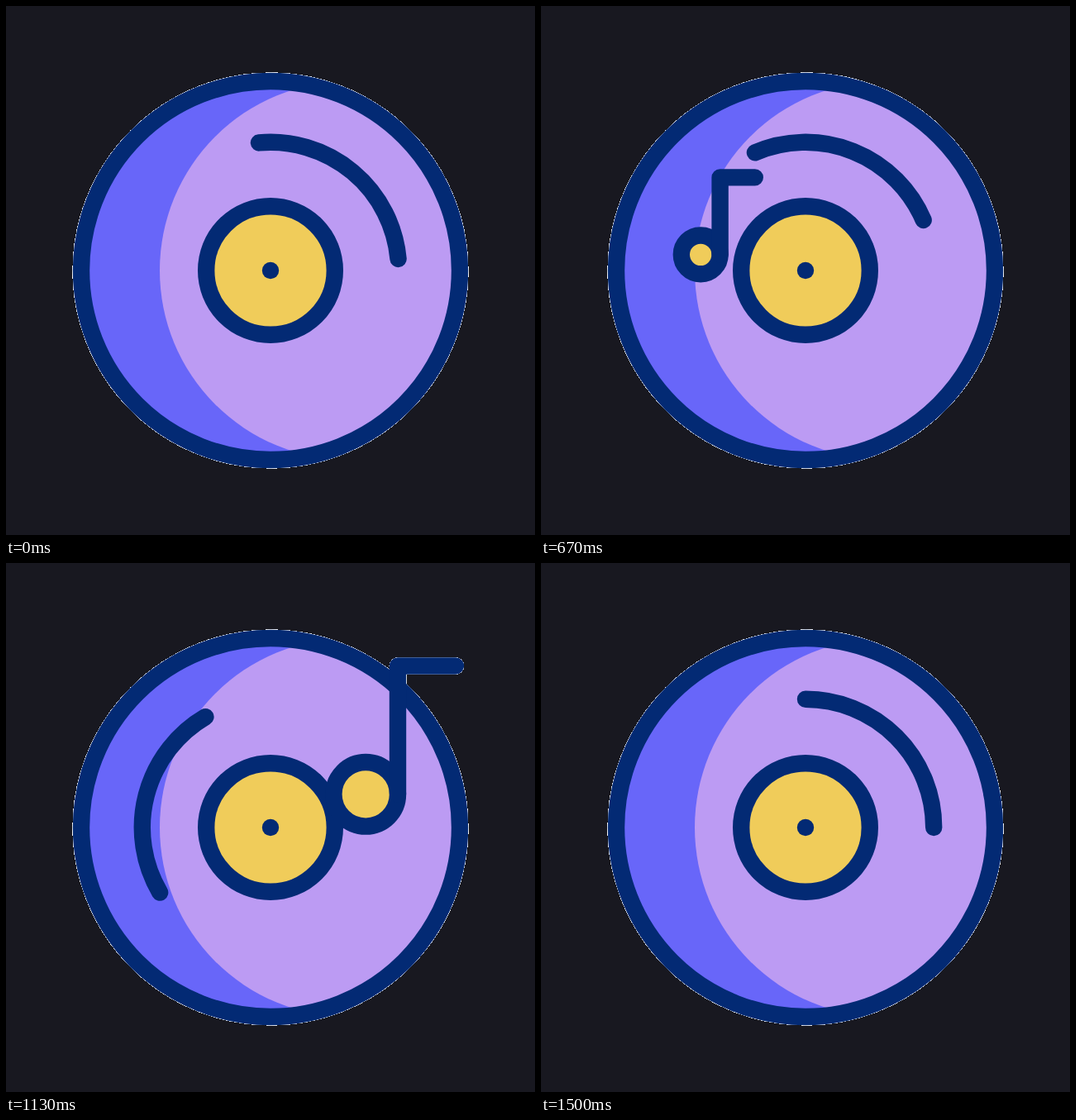
Recreate the animation shown at these times as an HTML page. Size 640 by 640 pixels, loop 2000 ms.

```html
<!DOCTYPE html>
<html lang="en">
<head>
<meta charset="utf-8">
<title>Spinning record</title>
<style>
  html, body { margin: 0; height: 100%; overflow: hidden; background: #181820; }
  svg { display: block; width: 100%; height: 100%; }
  .line { stroke: #032a74; stroke-width: 20.4; stroke-linecap: round; stroke-linejoin: round; }
  .halo { fill: #fff; stroke: #fff; stroke-width: 21; stroke-linecap: round; stroke-linejoin: round; shape-rendering: crispEdges; }
  .gold { fill: #f0cc5a; }
</style>
</head>
<body>
<svg viewBox="0 0 640 640">
  <defs>
    <clipPath id="face"><circle cx="320" cy="320" r="229"/></clipPath>
    <g id="small">
      <circle cx="193.2" r="23.4"/>
      <path fill="none" d="M216.6 0V-93.5H258.8"/>
    </g>
    <g id="large">
      <circle cx="435.2" r="38.8"/>
      <path fill="none" d="M474 0V-155.3H544"/>
    </g>
  </defs>

  <!-- white edges, visible only outside the disc -->
  <use href="#small" class="halo"/>
  <use href="#large" class="halo"/>
  <circle class="halo" cx="320" cy="320" r="229.2"/>

  <circle cx="320" cy="320" r="229" fill="#6866f9"/>
  <circle cx="415" cy="320" r="229" fill="#bc9bf3" clip-path="url(#face)"/>
  <circle class="line" cx="320" cy="320" r="229" fill="none"/>
  <circle class="line gold" cx="320" cy="320" r="77.8"/>
  <circle cx="320" cy="320" r="10.2" fill="#032a74"/>
  <path id="shine" class="line" fill="none" d="M320 164.8A155.2 155.2 0 0 1 475.2 320"/>

  <use href="#small" class="line gold note"/>
  <use href="#large" class="line gold note"/>
</svg>
<script>
  const LOOP = 2000, FPS = 30, RISE = 215, FADE_IN = 260, FADE_OUT = 305;
  const shine = document.getElementById('shine');
  const halos = document.querySelectorAll('use.halo');
  const notes = [
    { start: 357, end: 1073, y: 386.7 },
    { start: 712, end: 1444, y: 411.5 }
  ];
  document.querySelectorAll('.note').forEach((el, i) => {
    notes[i].el = el;
    notes[i].halo = halos[i];
  });

  // Smooth 0..1 ramp between two times
  const ease = (t, from, to) => {
    const u = Math.min(1, Math.max(0, (t - from) / (to - from)));
    return u * u * (3 - 2 * u);
  };

  function draw(t) {
    // wind back, then one full turn forward
    const angle = -61 * ease(t, -105, 480) + 421 * ease(t, 480, 1490);
    shine.setAttribute('transform', `rotate(${angle} 320 320)`);

    for (const { el, halo, start, end, y } of notes) {
      const move = `translate(0 ${y - RISE * ease(t, start, end)})`;
      const alpha = ease(t, start, start + FADE_IN) * (1 - ease(t, end - FADE_OUT, end));
      el.setAttribute('transform', move);
      el.setAttribute('opacity', alpha);
      halo.setAttribute('transform', move);
      halo.setAttribute('visibility', alpha > 0 ? 'visible' : 'hidden');
    }
  }

  const origin = performance.now();
  function tick() {
    const t = (performance.now() - origin) % LOOP;
    const step = Math.floor(t * FPS / 1000 + 0.15);
    draw((step * 1000 / FPS) % LOOP);
    requestAnimationFrame(tick);
  }
  tick();
</script>
</body>
</html>
```
